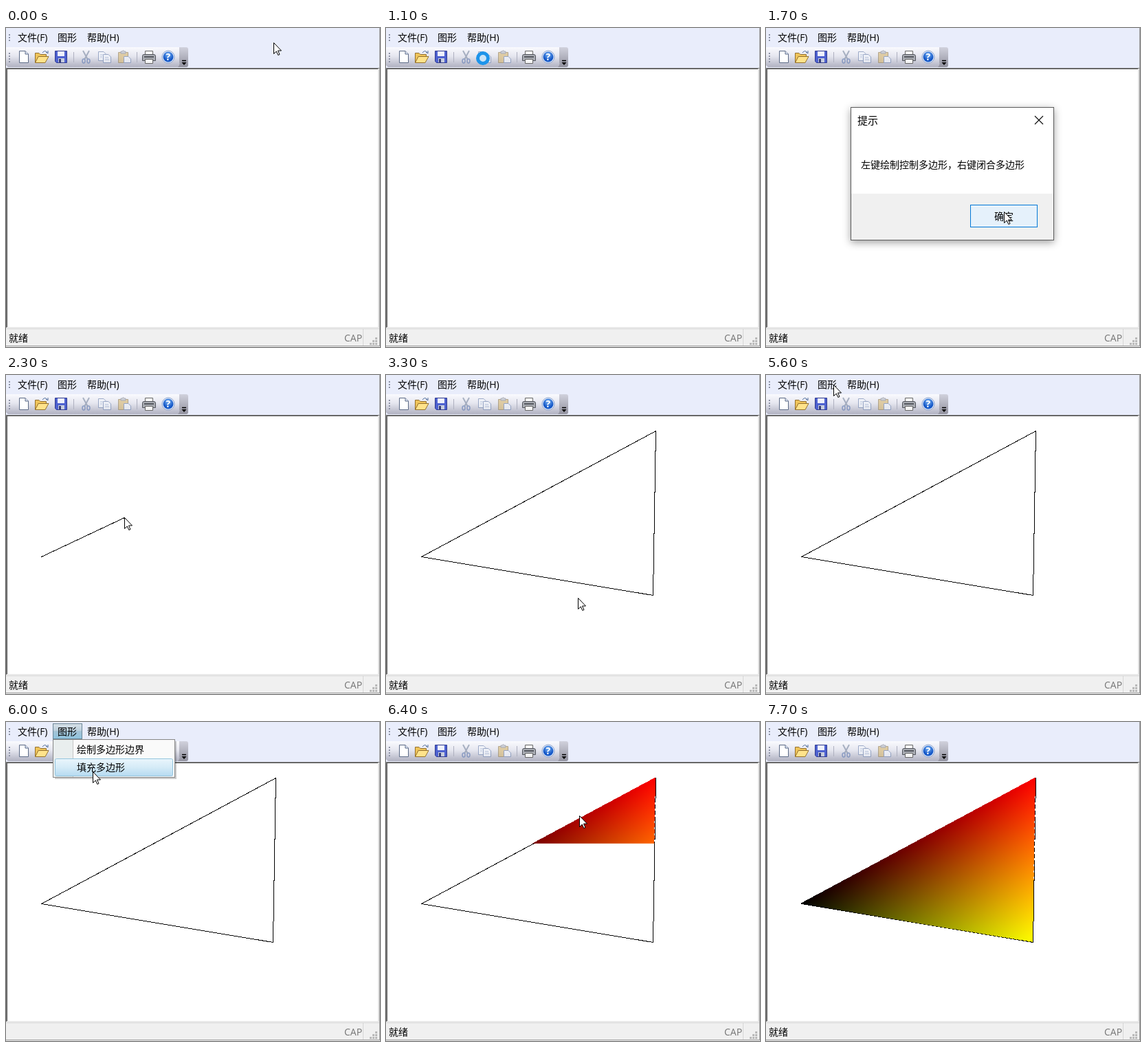
Recreate the animation shown at these times as an HTML page. Size 544 by 464 pixels, loop 7800 ms.

```html
<!DOCTYPE html>
<html lang="zh-CN">
<head>
<meta charset="utf-8">
<title>多边形填充</title>
<style>
html, body { margin: 0; width: 100%; height: 100%; overflow: hidden; background: #e9edfb; }
svg { display: block; }
text { font: 14px "Open Sans", "Noto Sans CJK SC", "Noto Sans CJK", sans-serif; }
.crisp { shape-rendering: crispEdges; }
.line { fill: none; stroke: #000; shape-rendering: crispEdges; }
.blend { isolation: isolate; }
.add { mix-blend-mode: screen; }
#dialog { filter: drop-shadow(0 3px 6px rgba(0, 0, 0, .38)); }
</style>
</head>
<body>
<svg width="544" height="464" viewBox="0 0 544 464">
<defs>
  <linearGradient id="bar" x2="0" y2="1"><stop stop-color="#fafafe"/><stop offset=".45" stop-color="#e5e6ef"/><stop offset="1" stop-color="#b0b1c1"/></linearGradient>
  <linearGradient id="more" x2="0" y2="1"><stop stop-color="#d0d1dc"/><stop offset="1" stop-color="#92929f"/></linearGradient>
  <linearGradient id="open" x2="0" y2="1"><stop stop-color="#d7e0e7"/><stop offset=".45" stop-color="#bdd0dd"/><stop offset=".5" stop-color="#a4c3d6"/><stop offset="1" stop-color="#8fc4df"/></linearGradient>
  <linearGradient id="hot" x2="0" y2="1"><stop stop-color="#e9f5fc"/><stop offset=".5" stop-color="#d5ebf7"/><stop offset="1" stop-color="#b5daf0"/></linearGradient>
  <linearGradient id="red" gradientUnits="userSpaceOnUse" x1="51" y1="264" x2="388.85" y2="269.65"><stop stop-color="#000"/><stop offset="1" stop-color="#f00"/></linearGradient>
  <linearGradient id="green" gradientUnits="userSpaceOnUse" x1="289.31" y1="136.11" x2="388" y2="320"><stop stop-color="#000"/><stop offset="1" stop-color="#0f0"/></linearGradient>
  <radialGradient id="ball" cy=".3"><stop stop-color="#7db6f5"/><stop offset="1" stop-color="#1659c8"/></radialGradient>
  <clipPath id="scan"><rect id="rows" y="80" width="544"/></clipPath>
</defs>

<!-- window chrome -->
<rect width="544" height="464" fill="#e9edfb"/>
<path d="M0 28H252V57H3L0 54Z" fill="url(#bar)"/>
<path d="M252 28H262Q265 28 265 31V54Q265 57 262 57H250Q253 55 252 50Z" fill="url(#more)"/>
<path d="M256 47.5h6" stroke="#000" stroke-width="1.5"/>
<path d="M255.500 50h7l-3.500 4z"/>
<path d="M5 9V21M5 36V51" stroke="#8d93a5" stroke-width="2" stroke-dasharray="2 2"/>
<path d="M98.500 35V50M190.500 35V50" stroke="#aeb0bf"/>
<g class="crisp">
  <rect y="58" width="543" height="378" fill="#777"/>
  <rect x="1" y="59" width="542" height="377" fill="#e3e3e3"/>
  <path d="M1 59H541V60H2V435H1Z" fill="#555"/>
  <rect x="2" y="60" width="539" height="375" fill="#fff"/>
  <rect y="436" width="544" height="28" fill="#f0f0f0"/>
  <path d="M0 437.500H544M519.500 438V462" stroke="#d6d6d6"/>
  <path d="M0 462.500H544M543.500 0V463" stroke="#999"/>
  <path d="M537 450h3v3h-3zM537 454h3v3h-3zM533 454h3v3h-3zM537 458h3v3h-3zM533 458h3v3h-3zM529 458h3v3h-3z" fill="#b9b9b9"/>
</g>

<!-- toolbar icons -->
<g stroke-linejoin="round">
  <path d="M19.500 33.500H28L32.500 38V50.500H19.500Z" fill="#fff" stroke="#5c6a86"/>
  <path d="M28 33.500V38H32.500" fill="#dce5f4" stroke="#5c6a86"/>
  <path d="M42.500 50.500V36.500H48L50 38.500H58.500V42" fill="#efc45a" stroke="#94702d"/>
  <path d="M42.500 50.500L47 41.500H62L57 50.500Z" fill="#ffe38b" stroke="#94702d"/>
  <path d="M53 36Q57 31 60 36M58 35L61 37V33" fill="none" stroke="#526f9f"/>
  <path d="M71.500 33.500H88.500V50.500H73.500L71.500 48.500Z" fill="#4d61cf" stroke="#303b91"/>
  <path d="M75 34H85V41H75Z" fill="#eef1fc"/>
  <path d="M76 44H85V50H76Z" fill="#c8cede"/><path d="M77 45h3v5h-3z" fill="#343d77"/>
  <g opacity=".65">
    <path d="M112 33L119 46M121 33L114 46" stroke="#8390a7" stroke-width="2"/>
    <ellipse cx="113" cy="48" rx="2" ry="3" fill="none" stroke="#657fb5" stroke-width="1.5"/>
    <ellipse cx="120" cy="48" rx="2" ry="3" fill="none" stroke="#657fb5" stroke-width="1.5"/>
    <g fill="#f3f6fc" stroke="#7186b0">
      <path d="M134.500 34.500H142L145.500 38V47.500H134.500Z"/>
      <path d="M141.500 38.500H149L152.500 42V50.500H141.500Z"/>
      <path d="M137 39h5M137 42h3M144 43h5M144 46h6" stroke="#9eafd0"/>
    </g>
    <path d="M163.500 35.500H177.500V50.500H163.500Z" fill="#d9bc7a" stroke="#93815b"/>
    <path d="M167 37V34H169Q170.500 31 172 34H174V37Z" fill="#bcc0c9" stroke="#858994"/>
    <path d="M171.500 41.500H178L181.500 45V50.500H171.500Z" fill="#f3f6fc" stroke="#7186b0"/>
  </g>
  <path d="M202.500 40V33.500H213.500V40" fill="#fff" stroke="#666"/>
  <path d="M198.500 40.500Q198.500 38.500 201 38.500H215Q217.500 38.500 217.500 41V47.500H198.500Z" fill="#a9acb3" stroke="#51545c"/>
  <path d="M201 42H215" stroke="#55585f" stroke-width="2"/>
  <path d="M202.500 45.500H213.500V51.500H202.500Z" fill="#f6f6f6" stroke="#666"/>
  <circle cx="236" cy="42" r="9" fill="#e7effc" stroke="#8ba4cf"/>
  <circle cx="236" cy="42" r="7.500" fill="url(#ball)"/>
  <text x="232.600" y="47" fill="#fff" style="font-weight:700">?</text>
</g>

<rect id="tab" x="68.500" y="2.500" width="42" height="22" fill="url(#open)" stroke="#6d8798"/>
<text x="17" y="19">文件(F)</text>
<text x="75" y="19">图形</text>
<text x="118" y="19">帮助(H)</text>
<text id="ready" x="4" y="456">就绪</text>
<text x="492" y="456" fill="#777">CAP</text>

<!-- polygon -->
<polyline id="edges" class="line"/>
<g clip-path="url(#scan)">
  <g class="blend crisp">
    <path d="M51 264L392 81L388 320Z" fill="url(#red)" stroke="url(#red)"/>
    <path class="add" d="M51 264L392 81L388 320Z" fill="url(#green)" stroke="url(#green)"/>
  </g>
  <path class="line" d="M392.500 81.500L388.500 320.500"/>
  <path class="line" d="M51.500 264.500L388.500 320.500" stroke-dasharray="3 3"/>
  <path class="line" d="M391.500 108L389.500 232" style="stroke:#fff" stroke-dasharray="3 6"/>
</g>

<!-- drop-down menu -->
<g id="menu">
  <path d="M71 28H248V83H71Z" fill="#000" opacity=".2"/>
  <path class="crisp" d="M68.500 25.500H245.500V80.500H68.500Z" fill="#fafafa" stroke="#868686"/>
  <path class="crisp" d="M69 26H97V80H69Z" fill="#e9eeee"/>
  <path class="crisp" d="M97.500 26V80" stroke="#c5c5c5"/>
  <rect id="hover" x="71.500" width="171" height="25" rx="2" fill="url(#hot)" stroke="#94c5de"/>
  <text x="103" y="45">绘制多边形边界</text>
  <text x="103" y="71">填充多边形</text>
</g>

<!-- message box -->
<g id="dialog">
  <rect x="123.500" y="115.500" width="295" height="193" fill="#fff" stroke="#5b5b5b"/>
  <path d="M124 241H418V308H124Z" fill="#f0f0f0"/>
  <text x="133" y="140" style="font-size:15px">提示</text>
  <path d="M391 128L403 140M403 128L391 140" stroke="#111" stroke-width="1.200"/>
  <text x="138" y="204">左键绘制控制多边形，右键闭合多边形</text>
  <rect id="button" x="297.500" y="257.500" width="97" height="32" stroke="#0078d7"/>
  <text x="332" y="279">确定</text>
</g>

<g id="busy">
  <circle cx="141" cy="44" r="7.500" fill="#c9e3f7" stroke="#1d94ea" stroke-width="5"/>
</g>
<path id="cursor" d="M.5 .5V16.500L4.300 13L6.800 18.500L9 17.500L6.500 12H11.500Z" fill="#fff" stroke="#000"/>
</svg>

<script>
const LOOP = 7800, STEP = 100;
const $ = id => document.getElementById(id);
const show = (id, on) => $(id).setAttribute('display', on ? 'inline' : 'none');

// Pointer stops: step, x, y
const stops = [
  [0, 389, 21], [3, 95, 13], [4, 95, 13], [5, 112, 34], [6, 128, 43], [7, 141, 44],
  [12, 141, 44], [13, 187, 90], [14, 281, 160], [16, 346, 267], [18, 346, 267],
  [20, 180, 298], [22, 51, 264], [25, 414, 92], [26, 392, 81], [27, 403, 110],
  [30, 388, 320], [33, 279, 324], [34, 253, 225], [35, 231, 151], [36, 290, 153],
  [37, 383, 163], [39, 521, 91], [40, 503, 147], [42, 447, 129], [43, 422, 159],
  [45, 422, 159], [46, 455, 176], [47, 455, 176], [48, 470, 152], [49, 478, 128],
  [50, 478, 128], [56, 98, 14], [58, 95, 13], [59, 110, 40], [60, 126, 72],
  [61, 126, 72], [67, 436, 200], [78, 436, 200]
];
// Polygon corners with the step of each click
const corners = [[22, 51, 264], [26, 392, 81], [30, 388, 320]];
const CLOSED = 31;

function pointer(s) {
  const i = stops.findIndex(p => p[0] > s);
  const [a, x, y] = stops[i - 1], [b, u, v] = stops[i];
  const k = (s - a) / (b - a);
  return [Math.round(x + (u - x) * k), Math.round(y + (v - y) * k)];
}

function draw(s) {
  const [x, y] = pointer(s);
  const within = (a, b) => s >= a && s < b;

  const menu = within(3, 7) || within(57, 62);
  show('menu', menu);
  show('tab', menu);
  show('ready', !menu);
  show('hover', y > 26);
  $('hover').setAttribute('y', y < 53 ? 27.5 : 53.5);

  show('dialog', within(12, 18));
  const over = y > 257;
  $('button').setAttribute('fill', over ? '#e5f1fb' : '#e1e1e1');
  $('button').setAttribute('stroke-width', over ? 1 : 2);

  const busy = within(8, 12);
  show('busy', busy);
  show('cursor', !busy && s < 68);
  $('cursor').setAttribute('transform', `translate(${x} ${y})`);

  const pts = corners.filter(c => s >= c[0]).map(c => [c[1], c[2]]);
  if (pts.length) pts.push(s < CLOSED ? [x, y] : pts[0]);
  $('edges').setAttribute('points', pts.map(p => p.map(n => n + .5)).join(' '));

  const filled = Math.min(1, Math.max(0, (s - 62) / 5));
  $('rows').setAttribute('height', 242 * filled);
}

const start = performance.now();
function tick() {
  draw(Math.floor((performance.now() - start) % LOOP / STEP));
  requestAnimationFrame(tick);
}
tick();
</script>
</body>
</html>
```
